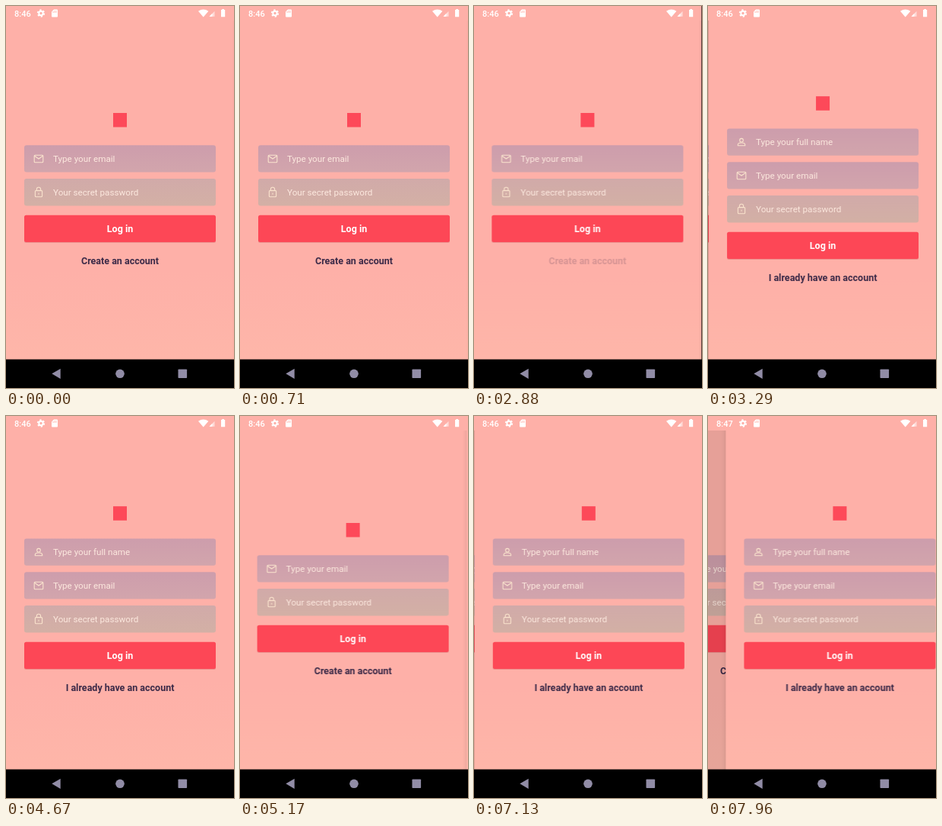
An HTML page for the animation above (8000 ms loop, 300 px wide and 500 px high).

```html
<!DOCTYPE html>
<html lang="en">
<head>
<meta charset="utf-8">
<title>Log in and sign up</title>
<style>
  html, body { margin: 0; width: 100%; height: 100%; overflow: hidden; background: #000; }
  svg { display: block; width: 300px; height: 500px; font-family: Roboto, sans-serif; }
  .hint { font-size: 11.67px; fill: #fce8de; }
  .icon { fill: none; stroke: #fae3cd; stroke-width: 1.1; }
  .bold { font-size: 12.5px; font-weight: 700; text-anchor: middle; }
  .link { fill: #3b2a48; }
  .clock { font-size: 11px; font-weight: 500; fill: #fff; }
</style>
</head>
<body>
<svg viewBox="0 0 300 500">
  <defs>
    <linearGradient id="page" x2="0" y2="1">
      <stop offset=".75" stop-color="#feb0a8"/>
      <stop offset="1" stop-color="#feb6a9"/>
    </linearGradient>
    <linearGradient id="mauve" x2="0" y2="1">
      <stop stop-color="#cd9dac"/>
      <stop offset="1" stop-color="#d2a5ac"/>
    </linearGradient>
    <linearGradient id="sand" x2="0" y2="1">
      <stop stop-color="#d1aaa9"/>
      <stop offset="1" stop-color="#d3b0a5"/>
    </linearGradient>
    <linearGradient id="edge">
      <stop stop-opacity="0"/>
      <stop offset="1" stop-opacity=".06"/>
    </linearGradient>
  </defs>

  <g id="login"></g>
  <rect id="shade" y="19" width="300" height="444" opacity="0"/>
  <g id="signup"></g>

  <g id="status" fill="#fff">
    <text class="clock" id="before" x="11" y="13.5">8:46</text>
    <text class="clock" id="after" x="11" y="13.5" opacity="0">8:47</text>
    <circle cx="46" cy="9.5" r="2.7" fill="none" stroke="#fff" stroke-width="2"/>
    <circle cx="46" cy="9.5" r="4.3" fill="none" stroke="#fff" stroke-width="1.7" stroke-dasharray="2.3 2.2"/>
    <path d="M63 4.5h4q1 0 1 1v8q0 1-1 1h-6q-1 0-1-1v-6z"/>
    <path d="M62 7v2M64 6v3M66 6v3" stroke="#feb0a8" stroke-width=".8"/>
    <path d="M253 6.8q6.7-4.6 13.4 0l-6.7 7.6z"/>
    <path d="M267.5 13.8l7-7v7z" opacity=".55"/>
    <path d="M267.5 13.8l4-4v4z"/>
    <path d="M284.3 4h2.6v1h1.3v9.2h-5.2V5h1.3z"/>
  </g>

  <rect y="462.5" width="300" height="37.5"/>
  <g fill="#918ca6">
    <path d="M60.3 481.3l11.4-6.6v13.2z"/>
    <circle cx="150" cy="481.3" r="5.8"/>
    <rect x="226.5" y="475.5" width="11.6" height="11.6" rx=".8"/>
  </g>
</svg>
<script>
const LOOP = 8000;
const $ = id => document.getElementById(id);

// Icons are drawn around their own centre.
const icons = {
  person: '<circle cy="-2.5" r="2.3"/><path d="M-4.7 4.6v-1.2q0-2.6 4.7-2.6t4.7 2.6v1.2z"/>',
  mail: '<rect x="-5.8" y="-4.7" width="11.6" height="9.4" rx="1"/><path d="M-5.5-3.8L0 0l5.5-3.8"/>',
  lock: '<rect x="-4.6" y="-2.2" width="9.2" height="8.2" rx="1"/><path d="M-2.6-2.2v-1.8a2.6 2.6 0 0 1 5.2 0v1.8M0 1v2"/>'
};
const fields = {
  person: ['Type your full name', 'mauve'],
  mail: ['Type your email', 'mauve'],
  lock: ['Your secret password', 'sand']
};

function field(kind, y) {
  const [hint, fill] = fields[kind];
  return `<rect x="24" y="${y}" width="252" height="35.4" rx="3" fill="url(#${fill})"/>
    <g class="icon" transform="translate(43 ${y + 17.8})">${icons[kind]}</g>
    <text class="hint" x="62" y="${y + 22}">${hint}</text>`;
}

function card(kinds, top, link) {
  const button = top + kinds.length * 43.8 + 4;
  return `<rect width="300" height="463" fill="url(#page)"/>
    <rect x="141" y="${top - 42.2}" width="18" height="18.5" fill="#fd4959"/>
    ${kinds.map((kind, i) => field(kind, top + i * 43.8)).join('')}
    <rect x="24" y="${button + .8}" width="252" height="35.4" rx="2.5" fill="#c0444d" opacity=".3"/>
    <rect x="24" y="${button}" width="252" height="35.2" rx="2.5" fill="#fd4756"/>
    <text class="bold" x="150" y="${button + 22.5}" fill="#fff">Log in</text>
    <text class="bold link" x="150" y="${button + 64.4}">${link}</text>`;
}

$('login').innerHTML = card(['mail', 'lock'], 182.2, 'Create an account');
$('signup').innerHTML = '<rect x="-5" y="19" width="5" height="444" fill="url(#edge)"/>' +
  card(['person', 'mail', 'lock'], 160.4, 'I already have an account');

// Steps are [time, value, easing towards the next step].
function play(element, steps, style) {
  const frames = steps.map(([time, value, easing = 'linear']) =>
    ({ offset: time / LOOP, easing, ...style(value) }));
  element.animate(frames, { duration: LOOP, iterations: Infinity });
}

const slide = 'cubic-bezier(.2833, .99, .31833, .99)';
const drag = 'cubic-bezier(.333, 0, .667, .333)';
const push1 = 2880, pop = 4853, push2 = 6703, dragStart = 7330;

const progress = [
  [0, 0], [push1, 0, slide], [push1 + 500, 1],
  [pop, 1, slide], [pop + 500, 0],
  [push2, 0, slide], [push2 + 500, 1],
  [dragStart, 1, drag], [LOOP, .913]
];
const shift = x => ({ transform: `translateX(${x}px)` });
const fade = opacity => ({ opacity });

play($('login'), progress, p => shift(-90 * p));
play($('signup'), progress, p => shift(303 - 303 * p));
play($('shade'), progress, p => fade(.1 * p));

// A pressed link dims before its slide and recovers after it.
const press = at => [[at - 150, 1], [at, .2], [at + 40, .2], [at + 290, 1]];
const dim = (id, ...taps) =>
  play($(id).querySelector('.link'), [[0, 1], ...taps.flatMap(press), [LOOP, 1]], fade);
dim('login', push1, push2);
dim('signup', pop);

const tick = [[0, 1], [dragStart, 1], [dragStart, 0], [LOOP, 0]];
play($('before'), tick, fade);
play($('after'), tick, v => fade(1 - v));
</script>
</body>
</html>
```
